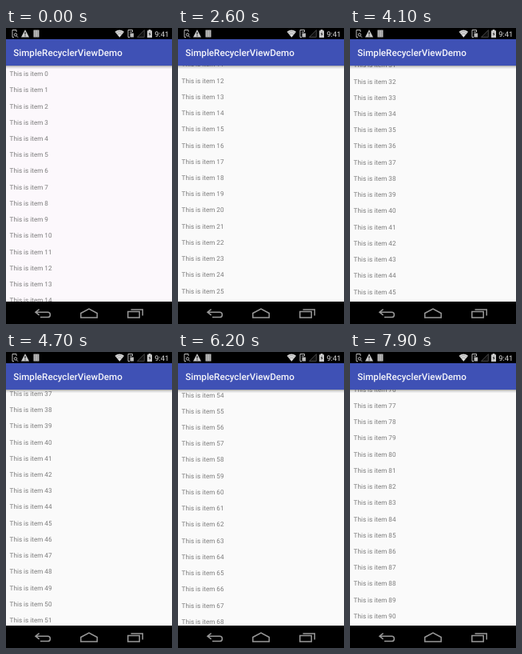
Recreate the animation shown at these times as an HTML page. Size 208 px wide and 370 px high, loop 8000 ms.

```html
<!DOCTYPE html>
<html lang="en">
<head>
<meta charset="utf-8">
<title>Scrolling list</title>
<style>
  html, body { margin: 0; width: 100%; height: 100%; overflow: hidden; background: #000; }
  svg { display: block; width: 100vw; height: 100vh; font-family: Roboto, sans-serif; text-rendering: geometricPrecision; }
  #items { font-size: 8.15px; fill: #7c7c7c; }
</style>
</head>
<body>
<svg viewBox="0 0 208 370">
  <defs>
    <linearGradient id="shade" x2="0" y2="1">
      <stop stop-color="#000" stop-opacity=".36"/>
      <stop offset=".4" stop-color="#000" stop-opacity=".13"/>
      <stop offset="1" stop-color="#000" stop-opacity="0"/>
    </linearGradient>
  </defs>

  <rect id="page" y="46" width="208" height="297"/>
  <g id="items"></g>

  <!-- App bar -->
  <rect y="47" width="208" height="4.5" fill="url(#shade)"/>
  <rect y="14" width="208" height="33" fill="#3f51b5"/>
  <text x="9.2" y="35" font-size="11.65" font-weight="500" fill="#f4f4fa">SimpleRecyclerViewDemo</text>

  <!-- Status bar -->
  <rect width="208" height="14"/>
  <g fill="none" stroke="#bbb">
    <path d="M13 5V2.5H8V11.5H10"/>
    <circle cx="12" cy="8.4" r="1.7"/>
    <path d="M13.2 9.8L15 11.7"/>
  </g>
  <path d="M24 2L29 11.5H19Z" fill="#ccc"/>
  <path d="M24 5V8.2M24 9.2V10.4" stroke="#000"/>
  <path d="M34.5 2.5H41.5V11.5H34.5Z" fill="#bbb"/>
  <path d="M36.7 2.5V11.5M39.3 2.5V11.5" stroke="#777" stroke-width=".6"/>
  <path d="M136.5 4.8Q142.3 .2 148 4.8L142.3 11.8Z" fill="#ddd"/>
  <path d="M137.8 6.1Q142.3 2.8 146.8 6.1M139.3 8Q142.3 6 145.3 8" fill="none" stroke="#666" stroke-width=".5"/>
  <path d="M158.5 5V2.5H153V11.5H155M155 5H158" fill="none" stroke="#bbb"/>
  <path d="M155.5 6.5H160V11.5H155.5Z" fill="#bbb"/>
  <path d="M164.5 11.4H173.3V2.6Z" fill="#111" stroke="#555" stroke-width=".8"/>
  <path d="M177 3.2H178.6V2H181.4V3.2H183V12H177Z" fill="#ccc"/>
  <path d="M180.5 4.7L178.7 7.8H180L179.5 10.4L181.5 7H180.2Z" fill="#222"/>
  <text x="186.3" y="10.9" font-size="9.25" fill="#ddd">9:41</text>

  <!-- Navigation bar -->
  <rect y="342" width="208" height="28"/>
  <g fill="none" stroke="#999" stroke-width="1.5">
    <path d="M41.6 351.6L37 355.2L41.6 358.8M37.5 355.2H52.2A3.2 3.2 0 0 1 52.2 361.6H43"/>
    <path d="M93.8 356.5L104 351L114.2 356.5V362H93.8Z"/>
    <path d="M152.8 354.6H167.2V362H152.8ZM156.5 352H171.2V359.4"/>
  </g>
</svg>
<script>
const LOOP = 8000, STEP = 100, PITCH = 20.23, BASELINE = 60.1, COUNT = 94;

// Each swipe: start time, duration (ms), scroll offset reached (px)
const swipes = [
  [1400, 1100, 223], [2600, 800, 432], [3600, 800, 650], [4500, 700, 854],
  [5500, 800, 1096], [6400, 900, 1341], [7400, 800, 1560]
];

const items = document.getElementById('items');
const page = document.getElementById('page');
for (let i = 0; i < COUNT; i++) {
  const label = document.createElementNS('http://www.w3.org/2000/svg', 'text');
  label.setAttribute('x', 4.6);
  label.setAttribute('y', BASELINE + i * PITCH);
  label.textContent = `This is item ${i}`;
  items.append(label);
}

// Finger accelerates, then the list coasts to rest
const fling = u => 1 - (1 - u * u) ** 3.5;

function scrollAt(time) {
  let offset = 0;
  for (const [start, duration, end] of swipes) {
    if (time < start) break;
    offset += (end - offset) * fling(Math.min(1, (time - start + STEP) / duration));
  }
  return offset;
}

function draw() {
  const time = Math.floor(performance.now() % LOOP / STEP) * STEP;
  items.setAttribute('transform', `translate(0 ${-scrollAt(time)})`);
  page.setAttribute('fill', time < 1500 ? '#fcf8fc' : '#fafafa');
  requestAnimationFrame(draw);
}
draw();
</script>
</body>
</html>
```
